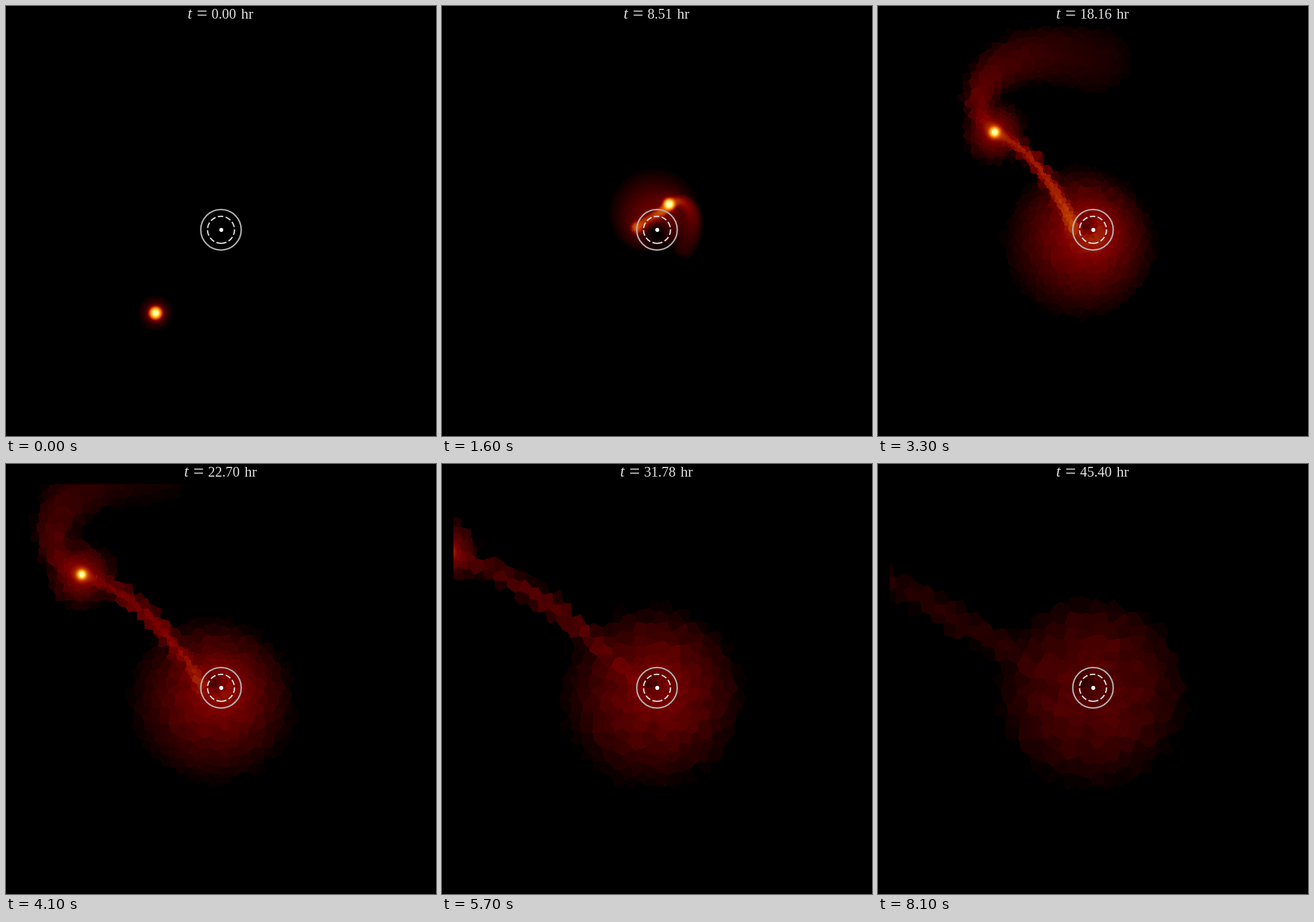
Recreate the animation shown at these times as an HTML page with a canvas. Size 748x748 px, loop 8200 ms.

```html
<!DOCTYPE html>
<html lang="en">
<head>
<meta charset="utf-8">
<title>Tidal disruption</title>
<style>
  html, body { margin: 0; width: 100%; height: 100%; overflow: hidden; background: #000; }
  canvas { display: block; }
</style>
</head>
<body>
<canvas id="stage" width="748" height="748"></canvas>
<script>
const ctx = document.getElementById('stage').getContext('2d');
const BX = 374, BY = 389;                       // black hole
const LEFT = 20, TOP = 35, RIGHT = 600, BOTTOM = 620;
const DEG = Math.PI / 180;
const image = ctx.createImageData(748, 748);

const ease = (from, to, k) => {
  const f = Math.max(0, Math.min(1, (k - from) / (to - from)));
  return f * f * (3 - 2 * f);
};
const decay = (k, span) => Math.exp(-k / span);

// Parabolic orbit, solved with Barker's equation.
function star(k) {
  const d = 2 * Math.sinh(Math.asinh(1.5 * (k - 13.1) / 2.62) / 3);
  return [BX + 35 * (1 - d * d), BY - 70 * d];
}

// Points along a Bezier curve of any degree.
function bezier(points, steps = 10) {
  return Array.from({ length: steps + 1 }, (_, n) => {
    const t = n / steps;
    let p = points;
    while (p.length > 1) {
      p = p.slice(1).map((q, i) => [p[i][0] + (q[0] - p[i][0]) * t, p[i][1] + (q[1] - p[i][1]) * t]);
    }
    return p[0];
  });
}

// A soft band along a path; width and strength change from start to end.
function ribbon(path, w0, w1, a0, a1) {
  const last = path.length - 1;
  return (x, y) => {
    let best = 0;
    for (let i = 0; i < last; i++) {
      const [px, py] = path[i], dx = path[i + 1][0] - px, dy = path[i + 1][1] - py;
      const f = Math.max(0, Math.min(1, ((x - px) * dx + (y - py) * dy) / (dx * dx + dy * dy || 1)));
      const u = (i + f) / last, w = w0 + (w1 - w0) * u;
      const d2 = (x - px - dx * f) ** 2 + (y - py - dy * f) ** 2;
      best = Math.max(best, (a0 + (a1 - a0) * u) * (1 - d2 / (w * w)));
    }
    return best;
  };
}

// Gas falling from the star to the black hole.
function bridge(k) {
  const [sx, sy] = star(k), ex = 340, ey = 385;
  const bow = 65 * Math.sin(Math.PI * (k - 15) / 64);
  const path = bezier([[sx, sy], [(sx + ex) / 2 + 12, (sy + ey) / 2 - bow], [ex, ey]]);
  const heat = .38 * decay(k - 22, 34) * ease(11, 16, k), w = 10 + k / 6;
  return ribbon(path, w, w * 1.3, heat, heat * 1.2);
}

// Gas thrown outwards; the curve unwinds and grows.
function tail(k) {
  const [sx, sy] = star(k);
  const turn = -150 * (1 - decay(k - 15, 14)), scale = 1.3 * (1 - decay(k - 11, 11));
  const arm = (length, angle) => [
    sx + length * scale * Math.cos((angle + turn) * DEG),
    sy + length * scale * Math.sin((angle + turn) * DEG)
  ];
  const heat = .34 * decay(k - 22, 34) * ease(11, 16, k);
  return ribbon(bezier([[sx, sy], arm(80, -37), arm(155, 16), arm(195, 70)]),
    6 + k / 2.5, 60 * scale, heat, heat * .25);
}

// Lopsided disc that spreads, rounds off and cools.
function disc(k) {
  const size = Math.max(1, 175 * (1 - decay(k - 5, 18)));
  const lean = .5 * decay(k - 15, 25), angle = (240 - 140 * decay(k - 15, 8)) * DEG;
  const heat = .42 * decay(k - 22, 62) * ease(10, 18, k), power = Math.max(1, k / 40);
  const early = Math.min(1, decay(k - 15, 4));
  const hx = 364 + 9 * early, hy = 382 + 14 * early, hw = 15 + 11 * early, depth = .5 + .5 * early;
  const cos = Math.cos(angle), sin = Math.sin(angle);
  return {
    density(x, y) {
      const dx = x - BX, dy = y - BY, r = Math.hypot(dx, dy) || 1;
      const reach = size * (1 + lean * (dx * cos - dy * sin) / r);
      return heat * Math.max(0, 1 - (r / reach) ** power);
    },
    hole: (x, y) => 1 - depth * Math.exp(-((x - hx) ** 2 + (y - hy) ** 2) / (hw * hw))
  };
}

// Returns the log density of the gas at one step as a function of place.
function makeField(k) {
  const [sx, sy] = star(k), grown = ease(14, 36, k);
  const core = 12 - k / 16, halo = 32 + 30 * grown, haloHeat = .13 + .09 * grown;
  const glow = .36 * ease(10, 20, k);
  const gas = disc(k), streams = k > 11 ? [bridge(k), tail(k)] : [];
  return (x, y) => {
    let sum = gas.density(x, y) ** 3;
    for (const stream of streams) sum += stream(x, y) ** 3;
    sum *= gas.hole(x, y) ** 3;
    const d2 = (x - sx) ** 2 + (y - sy) ** 2;
    if (d2 < 8000) {
      sum += (.85 * Math.exp(-d2 / (core * core))) ** 3 + (glow * Math.exp(-d2 / 500)) ** 3
        + (haloHeat * Math.max(0, 1 - d2 / (halo * halo))) ** 3;
    }
    return Math.cbrt(sum);
  };
}

function random(i, j, salt) {
  let h = Math.imul(i + 71, 374761393) ^ Math.imul(j + 37, 668265263) ^ Math.imul(salt, 974711);
  h = Math.imul(h ^ h >>> 13, 1274126177);
  return ((h ^ h >>> 16) >>> 0) / 4294967296;
}

// Voronoi cells of a jittered grid centred on the black hole.
function makeCells(size, field, noise) {
  const c = Math.ceil(374 / size) + 2, n = c + Math.ceil(240 / size) + 3;
  const xs = new Float32Array(n * n), ys = new Float32Array(n * n);
  const values = new Float32Array(n * n).fill(-1);
  for (let j = 0; j < n; j++) for (let i = 0; i < n; i++) {
    xs[j * n + i] = BX + (i - c + .1 + .8 * random(i - c, j - c, 1)) * size;
    ys[j * n + i] = BY + (j - c + .1 + .8 * random(i - c, j - c, 2)) * size;
  }
  return {
    xs, ys,
    pick(x, y) {
      const i0 = Math.floor((x - BX) / size) + c, j0 = Math.floor((y - BY) / size) + c;
      let best = 1e9, id = 0;
      for (let j = j0 - 1; j <= j0 + 1; j++) for (let i = i0 - 1; i <= i0 + 1; i++) {
        const m = j * n + i, d = (xs[m] - x) ** 2 + (ys[m] - y) ** 2;
        if (d < best) { best = d; id = m; }
      }
      return id;
    },
    value(id) {
      if (values[id] < 0) {
        values[id] = field(xs[id], ys[id]) * (1 + noise * (random(id % n - c, (id / n | 0) - c, 3) - .5));
      }
      return values[id];
    }
  };
}

function drawGas(k) {
  const field = makeField(k), [sx, sy] = star(k);
  const size = Math.max(3.5, 24 * (1 - decay(k - 10, 30))), noise = k / 250;
  const coarse = makeCells(size, field, noise), fine = makeCells(size * .55, field, noise * .6);
  const near = (x, y, cx, cy, r) => (x - cx) ** 2 + (y - cy) ** 2 < r * r;
  const data = image.data;
  for (let y = TOP; y < BOTTOM; y++) for (let x = LEFT; x < RIGHT; x++) {
    let v;
    if (near(x, y, sx, sy, 24)) v = field(x, y);
    else {
      const id = coarse.pick(x, y), cx = coarse.xs[id], cy = coarse.ys[id];
      v = coarse.value(id);
      const dense = v > .22 || near(cx, cy, BX, BY, 60) || near(cx, cy, sx, sy, 45);
      if (dense) v = fine.value(fine.pick(x, y));
    }
    const o = (y * 748 + x) * 4, heat = v < .015 ? 0 : 510 * v;
    data[o] = heat;
    data[o + 1] = heat - 128;
    data[o + 2] = heat - 255;
    data[o + 3] = 255;
  }
  ctx.fillStyle = '#000';
  ctx.fillRect(0, 0, 748, 748);
  ctx.putImageData(image, 0, 0);
}

function ring(r, width, color, dash) {
  ctx.setLineDash(dash);
  ctx.lineWidth = width;
  ctx.strokeStyle = color;
  ctx.beginPath();
  ctx.arc(BX, BY + .3, r, Math.PI / 2, -Math.PI * 1.5, true);
  ctx.stroke();
}

function drawLabel(k) {
  const hours = (k * .5675 + 1e-6).toFixed(2), half = hours.length > 4 ? 64 : 58;
  const left = BX - half;
  const write = (text, x, y, size, style = '') => {
    ctx.font = `${style} ${size}px "Liberation Serif", "Times New Roman", serif`;
    ctx.fillText(text, x, y);
  };
  ctx.fillStyle = '#e0e0e0';
  write('t', left, 21.5, 27, 'italic');
  write('=', left + 15.8, 23.8, 33);
  write(hours, left + 41.4, 21.5, 24.5);
  write('hr', BX + half - 23, 21.5, 25.5);
}

function draw(k) {
  drawGas(k);
  ring(35.2, 2.5, '#b0b0b0', []);
  ring(23.5, 2.3, '#dcdcdc', [9.67, 4.19]);
  ctx.fillStyle = '#fff';
  ctx.beginPath();
  ctx.arc(374.5, 389.5, 3.4, 0, 2 * Math.PI);
  ctx.fill();
  drawLabel(k);
}

const start = performance.now();
let shown = -1;
function tick() {
  const time = (performance.now() - start) % 8200;
  const k = Math.max(0, Math.floor(time / 100) - 1);
  if (k !== shown) draw(shown = k);
  requestAnimationFrame(tick);
}
tick();
</script>
</body>
</html>
```
